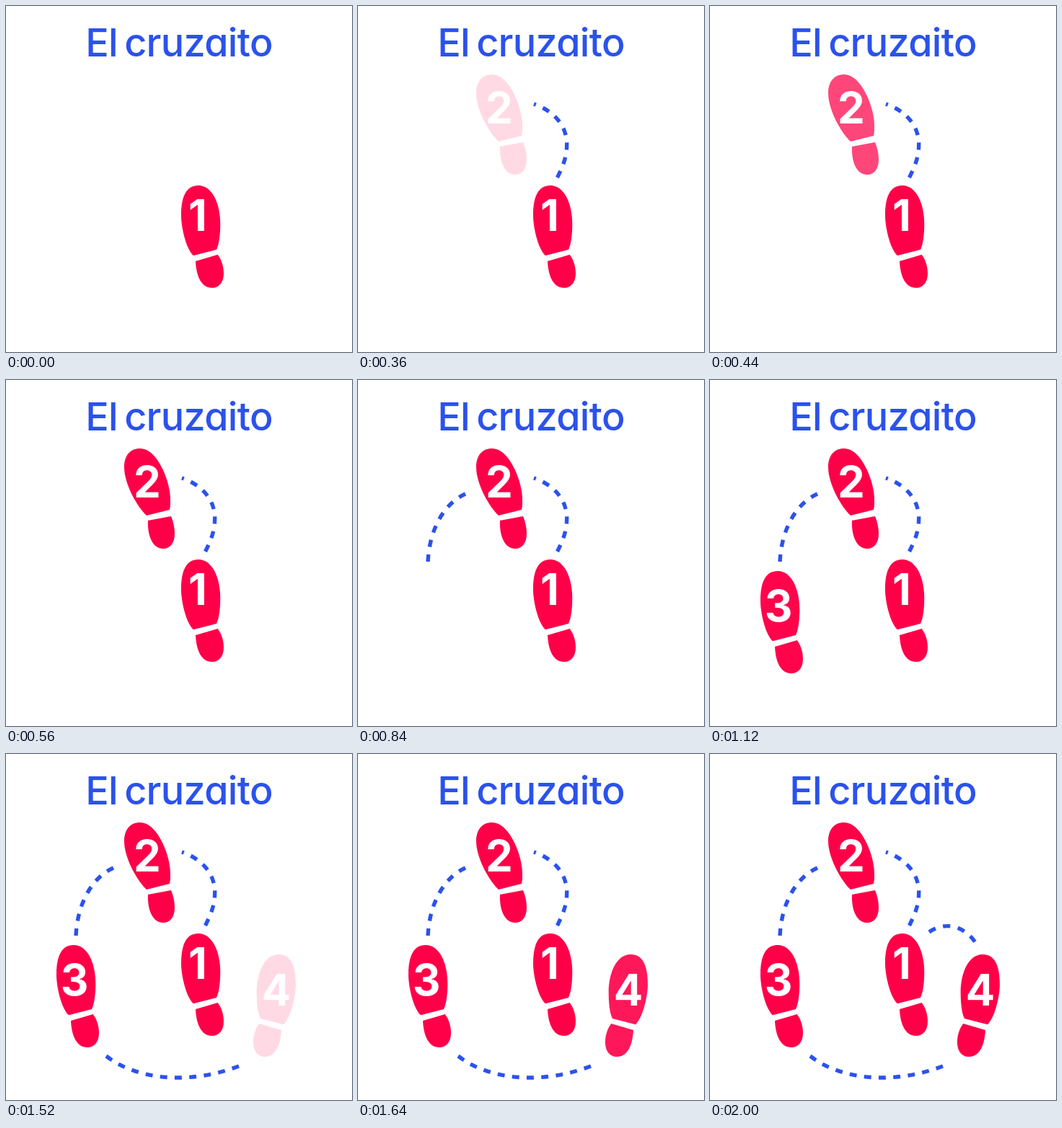
Write an HTML page that moves like this. It is 480 by 480 pixels and loops after 2520 ms.

```html
<!DOCTYPE html>
<html lang="es">
<head>
<meta charset="utf-8">
<title>El cruzaito</title>
<style>
  html, body { margin: 0; width: 100%; height: 100%; overflow: hidden; background: #fff; }
  svg { display: block; width: 100vw; height: 100vh; }
  text { font-family: Inter, "Open Sans", sans-serif; text-anchor: middle; }
  .title { font-size: 54px; font-weight: 500; letter-spacing: -0.7px; word-spacing: -4.5px; fill: #2b52ec; font-feature-settings: "cv11"; }
  .digit { font-size: 60px; font-weight: 750; fill: #fff; }
  .shoe { fill: #ff0048; }
  .trail { fill: none; stroke: #2b52ec; stroke-width: 5.4; }
</style>
</head>
<body>
<svg viewBox="0 0 480 480">
  <defs>
    <path id="shoe" d="M260 346.3C249 336 243 305 243 291C243 264 250 249 267 249C286 249 297.3 274 297.3 302C297.3 318 295.5 331 292 338Z
      M263 354L293.7 345C299 352 302 361 302 371C302 383 296 391 286 391C271 391 264 375 263 354Z"/>
  </defs>

  <text class="title" x="240" y="70">El cruzaito</text>

  <g>
    <use class="shoe" href="#shoe"/>
    <text class="digit" x="266" y="312">1</text>
  </g>
  <g class="foot">
    <path class="shoe" d="M195 188C182 176 164 144 164 121C164 105 172 95 186 95C200 95 211 110 217.5 124C224 138 228 153 228 166C228 172 228 176 227 180Z
      M197 195L229 189C232 196 234 205 234 213C234 226 228 234 218 234C204 234 196 217 197 195Z"/>
    <text class="digit" x="196" y="163">2</text>
  </g>
  <g class="foot">
    <use class="shoe" href="#shoe" transform="translate(-173 16)"/>
    <text class="digit" x="95" y="335">3</text>
  </g>
  <g class="foot">
    <use class="shoe" href="#shoe" transform="translate(645 29) scale(-1 1)"/>
    <text class="digit" x="375" y="349">4</text>
  </g>

  <path class="trail" pathLength="126" d="M276.5 238C284.5 222 289.7 209 289.7 192C289.7 163 268 144 244 136"/>
  <path class="trail" pathLength="112.5" d="M149 158C118 172 99 209 97 252"/>
  <path class="trail" pathLength="194.5" d="M139 419C184 454 258 458 323 433"/>
  <path class="trail" pathLength="71.5" d="M367.5 260.5C350 236 324 233 304 247"/>
</svg>
<script>
  const LOOP = 2520, TICK = 40, DASH = 10, GAP = 10.5;
  const starts = [40, 640, 1200, 1800];
  const fade = [0.02, 0.14, 0.44, 0.72, 0.9, 0.98, 1];
  const fadeDelay = 7; // ticks after the trail begins
  const trails = document.querySelectorAll(".trail");
  const feet = document.querySelectorAll(".foot");

  const smooth = x => x * x * (3 - 2 * x);
  const clamp = x => Math.min(1, Math.max(0, x));

  // Dash pattern that shows only the first part of a trail.
  function dashes(shown) {
    const full = Math.floor(shown / (DASH + GAP));
    const rest = shown - full * (DASH + GAP);
    return `${DASH} ${GAP} `.repeat(full) + `${Math.min(DASH, rest)} 999`;
  }

  function draw(time) {
    const tick = Math.floor((time % LOOP) / TICK);
    starts.forEach((start, i) => {
      const step = tick - start / TICK;
      const trail = trails[i];
      const shown = smooth(clamp((step + 1) / 6));
      trail.style.visibility = shown ? "visible" : "hidden";
      trail.setAttribute("stroke-dasharray", dashes(shown * trail.getAttribute("pathLength")));
      if (feet[i]) {
        const k = step - fadeDelay;
        feet[i].style.opacity = k < 0 ? 0 : fade[Math.min(k, fade.length - 1)];
      }
    });
  }

  const begin = performance.now();
  function loop() {
    draw(performance.now() - begin);
    requestAnimationFrame(loop);
  }
  loop();
</script>
</body>
</html>
```
